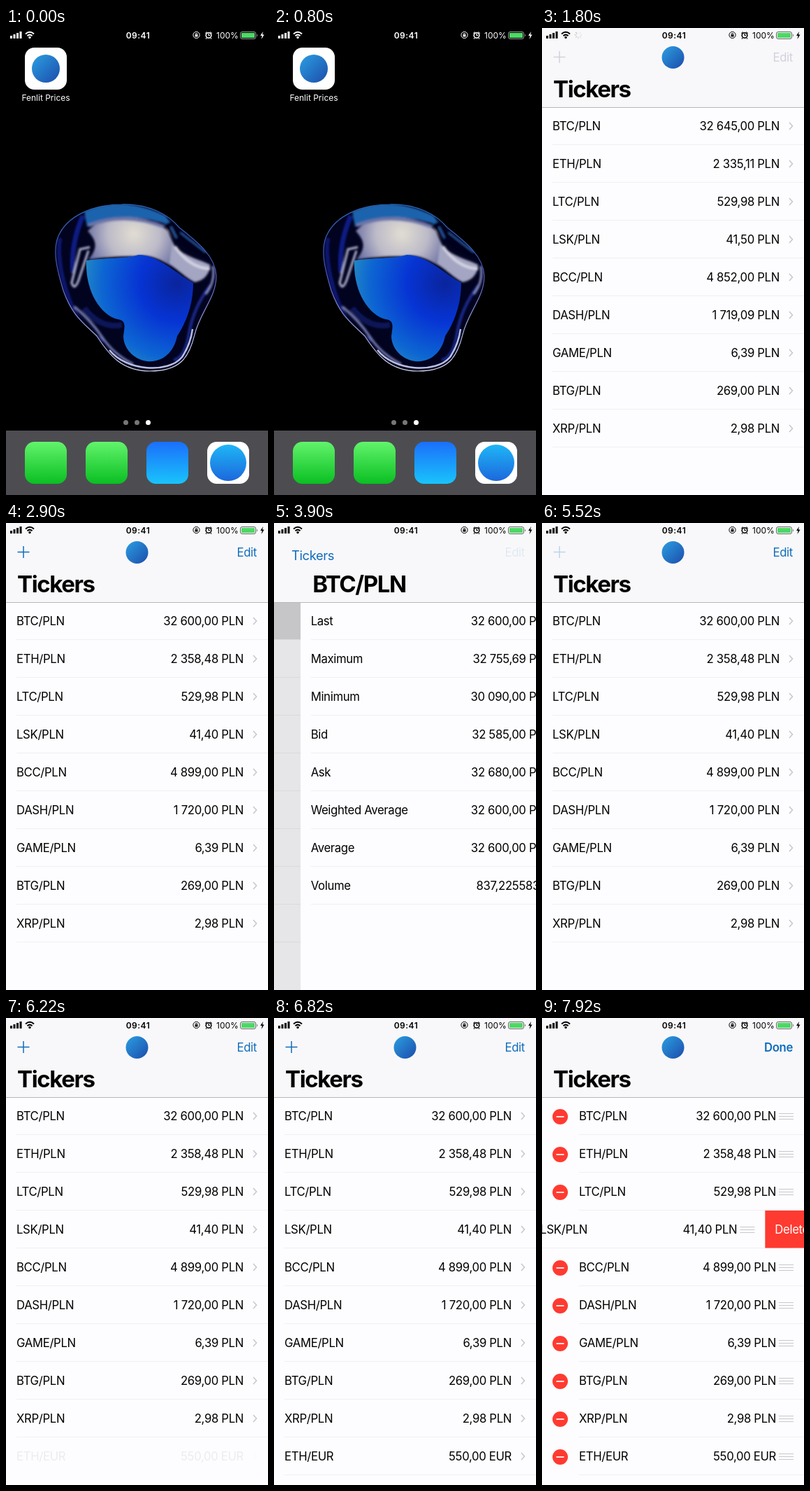
These frames come from a looping animation (375 by 667 pixels, 8000 ms). An HTML page:

```html
<!DOCTYPE html>
<html lang="en">
<head>
<meta charset="utf-8">
<title>Price tickers</title>
<style>
  html, body { margin: 0; width: 100%; height: 100%; overflow: hidden; background: #000; }
  svg { display: block; width: 375px; height: 667px; }
  text { font: 16.7px Inter, Arial, sans-serif; letter-spacing: -.32px; fill: currentColor; white-space: pre; }
  .end { text-anchor: end; }
  .mid { text-anchor: middle; }
  .large { font-size: 33px; font-weight: 700; letter-spacing: -1.4px; }
  .bold { font-weight: 600; }
  .small { font-size: 12px; letter-spacing: 0; }
  .white { fill: #fff; }
  .tint { color: #0f6cbc; }
  .line { fill: none; stroke: currentColor; }
  .sep { stroke: #f0f0f3; }
</style>
</head>
<body>
<svg viewBox="0 0 375 667">
  <defs>
    <linearGradient id="green" x2="0" y2="1"><stop stop-color="#62f36c"/><stop offset="1" stop-color="#0abf22"/></linearGradient>
    <linearGradient id="mail" x2="0" y2="1"><stop stop-color="#1b6ffb"/><stop offset="1" stop-color="#19c4fb"/></linearGradient>
    <linearGradient id="web" x2="0" y2="1"><stop stop-color="#1fb6f6"/><stop offset="1" stop-color="#1c68dc"/></linearGradient>
    <linearGradient id="disc" x2="1" y2="1"><stop stop-color="#2b9fe2"/><stop offset="1" stop-color="#1c4cab"/></linearGradient>
    <linearGradient id="rim" x2="0" y2="1"><stop stop-color="#2a68b8"/><stop offset=".4" stop-color="#4a55b4"/><stop offset="1" stop-color="#d9dcf2"/></linearGradient>
    <radialGradient id="core" gradientUnits="userSpaceOnUse" cx="245" cy="365" r="135"><stop stop-color="#0a249c"/><stop offset=".4" stop-color="#0634d4"/><stop offset=".8" stop-color="#0d66d2"/><stop offset="1" stop-color="#2287c4"/></radialGradient>
    <radialGradient id="cream" gradientUnits="userSpaceOnUse" cx="183" cy="294" r="75"><stop stop-color="#e2ddd2"/><stop offset=".5" stop-color="#bcbac8"/><stop offset="1" stop-color="#5c629c"/></radialGradient>
    <filter id="soft" x="-20%" y="-20%" width="140%" height="140%"><feGaussianBlur stdDeviation="1.8"/></filter>
    <path id="blob" d="M165 252C205 251 232 266 248 285C272 304 300 325 301 354C301 385 278 405 270 438C262 470 250 490 206 490C165 490 147 466 130 440C112 422 95 412 82 375C73 345 66 318 75 297C88 268 125 252 165 252Z"/>
    <clipPath id="blobClip"><use href="#blob"/></clipPath>
  </defs>

  <g id="home">
    <rect width="375" height="667"/>
    <use href="#blob" fill="#02031f"/>
    <g clip-path="url(#blobClip)">
      <g filter="url(#soft)" fill="none">
        <path d="M112 262Q165 238 228 268L240 284Q178 258 116 284Z" fill="#1c63ae"/>
        <path d="M110 268Q92 310 96 350" stroke="#0d1a86" stroke-width="7"/>
        <path d="M77 300Q72 340 92 392T140 445" stroke="#0c1470" stroke-width="6"/>
        <path d="M117 290C140 264 205 264 232 290C238 306 246 318 256 352C228 334 208 321 185 326C158 326 132 328 118 331C130 316 132 306 117 290Z" fill="url(#cream)"/>
        <path d="M118 282Q170 262 226 284" stroke="#6d76a8" stroke-width="5"/>
        <path d="M238 306C250 326 276 330 292 338C292 350 284 361 270 363C258 357 246 346 234 336Z" fill="#a3a5c2"/>
        <path d="M242 312Q262 342 292 344" stroke="#d4d4e2" stroke-width="4"/>
        <path d="M232 278Q250 312 298 326" stroke="#03041c" stroke-width="12"/>
        <path d="M236 284L244 300M250 292L286 320" stroke="#2d63b4" stroke-width="2"/>
        <path d="M120 313L106 316L94 364Q98 376 104 360L118 318" stroke="#b4b8d6" stroke-width="3"/>
        <path d="M112 400Q135 430 166 424" stroke="#0b1258" stroke-width="8"/>
        <path d="M292 368Q268 400 262 436T240 474" stroke="#1a2a92" stroke-width="4"/>
        <path d="M98 398Q122 418 138 442T182 480" stroke="#7f88c4" stroke-width="3"/>
        <path d="M296 340Q300 362 286 380" stroke="#8a92c8" stroke-width="3"/>
      </g>
      <path d="M115 332C140 328 170 330 190 324C220 325 245 352 268 364C268 395 258 420 245 440C240 465 222 478 202 476C180 473 168 455 168 440C170 425 172 418 160 416C135 410 113 375 115 332Z" fill="url(#core)"/>
      <path d="M148 460C172 490 232 494 252 470Q264 452 267 430" fill="none" stroke="#b9bfe2" stroke-width="2.500"/>
    </g>
    <use href="#blob" fill="none" stroke="url(#rim)" stroke-width="1.200"/>
    <rect x="27" y="28" width="60" height="60" rx="13.5" fill="#fff"/>
    <circle cx="57" cy="58" r="20" fill="url(#disc)"/>
    <text class="small mid white" x="57" y="104">Fenlit Prices</text>
    <g fill="#777"><circle cx="171.500" cy="563.5" r="3.5"/><circle cx="187.500" cy="563.5" r="3.5"/><circle cx="203.500" cy="563.5" r="3.5" fill="#fff"/></g>
    <rect y="575" width="375" height="92" fill="#4d4d51"/>
    <g id="dock"></g>
  </g>

  <g id="app">
    <rect width="375" height="667" fill="#fdfcfe"/>
    <g id="list"></g>
    <rect id="dim" y="113" width="375" height="554"/>
    <g id="detail"><rect y="113" width="375" height="554" fill="#fdfcfe"/></g>
    <rect width="375" height="113" fill="#f8f8fa"/>
    <path d="M0 113.500H375" stroke="#b7b7bb"/>
    <g id="nav" class="tint">
      <g id="plusFade"><path id="plus" class="line" d="M16.500 41.500H33.500M25 33V50" stroke-width="1.5"/></g>
      <g id="edit"><text id="editText" class="end" x="359" y="48">Edit</text></g>
    </g>
    <text id="done" class="tint end bold" x="359" y="48">Done</text>
    <circle id="logo" cx="187.500" cy="42" r="16" fill="url(#disc)"/>
    <text id="title" class="large">Tickers</text>
    <text id="back" class="tint">Tickers</text>
    <path id="chevron" class="tint line" d="M18 33L9 42L18 51" stroke-width="2.5"/>
    <text id="pair" class="large" x="17.500" y="98.500">BTC/PLN</text>
  </g>

  <g id="status">
    <path d="M6 15v-4h3v4zM10.500 15v-6h3v6zM15 15v-8h3v8zM19.500 15v-10h3v10z" fill="currentColor"/>
    <path class="line" d="M28 8.500Q34 3 40 8.500M30.500 11.300Q34 8 37.500 11.300" stroke-width="2"/>
    <circle cx="34" cy="13.500" r="1.700" fill="currentColor"/>
    <text class="small mid bold" x="189" y="14.500" style="letter-spacing:.5px">09:41</text>
    <circle class="line" cx="272.500" cy="10" r="4.600"/>
    <path d="M270.500 9.500h4v3h-4z" fill="currentColor"/><path class="line" d="M271.300 9.500v-1.500h2.400v1.500"/>
    <circle class="line" cx="290" cy="10.500" r="3.800" stroke-width="1.600"/>
    <path class="line" d="M290 8v2.500h2M285.500 8l2-2.500M294.500 8l-2-2.500M287 14.500l-1 1M293 14.500l1 1" stroke-width="1.200"/>
    <text class="small" x="301" y="14.500">100%</text>
    <rect class="line" x="335.500" y="5.500" width="22" height="10" rx="2.500" opacity=".6"/>
    <rect x="337" y="7" width="19" height="7" rx="1" fill="#4cd964"/>
    <path d="M359 8.500q2 2 0 4z" fill="currentColor" opacity=".6"/>
    <path d="M368 5l-4 6h2.500l-1 5 4-6.500h-2.500z" fill="currentColor"/>
    <g id="spinner"></g>
  </g>
</svg>
<script>
const LOOP = 8000;
const $ = s => document.querySelector(s);
const add = (s, markup) => $(s).insertAdjacentHTML('beforeend', markup);

// Static parts
add('#dock', ['url(#green)', 'url(#green)', 'url(#mail)', '#fff'].map((fill, i) =>
  `<rect x="${27 + 87 * i}" y="591" width="60" height="60" rx="13.5" fill="${fill}"/>`).join('') +
  '<circle cx="318" cy="621" r="26" fill="url(#web)"/>');

add('#spinner', Array.from({ length: 8 }, (_, i) =>
  `<path d="M52 4.500v3" stroke="#777" stroke-opacity="${(i + 1) / 8}" transform="rotate(${45 * i} 52 10)"/>`).join(''));

// Pair, price, and the price before the first refresh where it differs
const tickers = [
  ['BTC/PLN', '32 600,00 PLN', '32 645,00 PLN'],
  ['ETH/PLN', '2 358,48 PLN', '2 335,11 PLN'],
  ['LTC/PLN', '529,98 PLN'],
  ['LSK/PLN', '41,40 PLN', '41,50 PLN'],
  ['BCC/PLN', '4 899,00 PLN', '4 852,00 PLN'],
  ['DASH/PLN', '1 720,00 PLN', '1 719,09 PLN'],
  ['GAME/PLN', '6,39 PLN'],
  ['BTG/PLN', '269,00 PLN'],
  ['XRP/PLN', '2,98 PLN'],
  ['ETH/EUR', '550,00 EUR']
];
const stats = [
  ['Last', '32 600,00 PLN'], ['Maximum', '32 755,69 PLN'], ['Minimum', '30 090,00 PLN'],
  ['Bid', '32 585,00 PLN'], ['Ask', '32 680,00 PLN'], ['Weighted Average', '32 600,00 PLN'],
  ['Average', '32 600,00 PLN'], ['Volume', '837,22558310']
];
const rowY = i => 140 + 54 * i;
const sep = '<path class="sep" d="M15 26.500H375"/>';

add('#list', tickers.map(([pair, price, old], i) => `
  <g transform="translate(0 ${rowY(i)})"><g id="row${i}">
    ${i ? '' : '<rect id="press" y="-26" width="375" height="53" fill="#d9d9dc"/>'}
    <g class="label">${sep}<text x="15" y="6">${pair}</text></g>
    <g class="price">
      <text class="end ${old ? 'fresh' : ''}" x="340" y="6">${price}</text>
      ${old ? `<text class="end stale" x="340" y="6">${old}</text>` : ''}
    </g>
    <path class="arrow" d="M354 -5l4.500 5l-4.500 5" fill="none" stroke="#c7c7cc" stroke-width="1.500"/>
    <g class="minus"><circle cx="26" cy="1" r="11" fill="#ff3a30"/><path d="M20.500 1h11" stroke="#fff" stroke-width="1.700"/></g>
    <path class="grip" d="M339 -3.500h21M339 .5h21M339 4.500h21" stroke="#c8c8cd"/>
    ${i === 3 ? '<rect x="375" y="-27" width="90" height="53.500" fill="#ff3a30"/><text class="white" x="389" y="6">Delete</text>' : ''}
  </g></g>`).join(''));

add('#detail', stats.map(([name, value], i) =>
  `<g transform="translate(0 ${rowY(i)})">${sep}<text x="15" y="6">${name}</text><text class="end" x="359" y="6">${value}</text></g>`).join(''));

// Motion: each segment is [start, end, from, to, easing]; values hold in between
const GLIDE = 'cubic-bezier(.2,.785,.2,1)';
const anims = [];
function tween(sel, prop, segments) {
  const frames = [{ [prop]: segments[0][2], offset: 0 }];
  for (const [t0, t1, from, to, easing = 'linear'] of segments)
    frames.push({ [prop]: from, offset: t0 / LOOP, easing }, { [prop]: to, offset: t1 / LOOP });
  frames.push({ [prop]: segments.at(-1)[3], offset: 1 });
  for (const node of document.querySelectorAll(sel)) {
    const a = node.animate(frames, { duration: LOOP, fill: 'both' });
    a.pause();
    anims.push(a);
  }
}
const fade = (sel, ...segments) => tween(sel, 'opacity', segments);
const move = (sel, ...segments) => tween(sel, 'transform', segments);
const x = n => `translateX(${n}px)`;
const place = (px, py, k) => `translate(${px}px,${py}px) scale(${k})`;

// Launch and first refresh
fade('#app', [1000, 1100, 0, 1]);
move('#app', [1000, 1400, 'translate(27px,28px) scale(.16,.09)', 'translate(0px,0px) scale(1,1)', GLIDE]);
tween('#status', 'color', [[1150, 1150, '#fff', '#000']]);
tween('#nav', 'color', [[1900, 1900, '#d2d1dc', '#0f6cbc']]);
fade('#spinner', [1400, 1500, 0, 1], [1700, 1900, 1, 0]);
fade('.stale', [2100, 2100, 1, 0]);
fade('.fresh', [2100, 2100, 0, 1]);

// Open the detail page and return
const PUSH = [3700, 4200], POP = [4700, 5200];
const visit = (from, to) => [[...PUSH, from, to, GLIDE], [...POP, to, from, GLIDE]];
const swap = (from, to) => [[3700, 3880, from, to], [4700, 4900, to, from]];
fade('#press', [3600, 3600, 0, 1], [5200, 5450, 1, 0]);
move('#list', ...visit(x(0), x(-112)));
fade('#dim', ...visit(0, .1));
move('#detail', ...visit(x(375), x(0)));
move('#pair', ...visit(x(375), x(0)));
move('#title', ...visit(place(16, 98.5, 1), place(26, 48, .51)));
move('#back', ...visit(place(16, 98.5, 1.96), place(26, 48, 1)));
fade('#title', ...swap(1, 0));
fade('#back', ...swap(0, 1));
fade('#chevron', [3900, 4200, 0, 1], [4700, 4850, 1, 0]);
fade('#logo', ...swap(1, 0));
fade('#edit', ...visit(1, 0));

// Add a pair
fade('#plus', ...swap(1, 0), [5450, 5450, 1, .25], [5650, 5750, .25, 1]);
fade('#row9', [6200, 6500, 0, 1]);

// Edit mode and row removal
const EDIT = [7150, 7450];
const edit = (from, to) => [...EDIT, from, to, 'ease-in-out'];
move('.label', edit(x(0), x(38)));
move('.price', edit(x(0), x(-5)));
move('.minus', edit(x(-40), x(0)));
move('.grip', edit(x(40), x(0)));
fade('.grip', edit(0, 1));
fade('.arrow', edit(1, 0));
fade('#plusFade', edit(1, 0));
fade('#editText', edit(1, 0));
fade('#done', edit(0, 1));
move('#row3', [7820, 8000, x(0), x(-75), 'ease-out']);

// The picture advances ten times a second, with one short step at 4400
const snap = t => t < 4420 ? Math.floor(t / 100) * 100 : Math.floor((t - 20) / 100) * 100 + 20;
const start = performance.now();
function draw() {
  const t = snap((performance.now() - start) % LOOP);
  for (const a of anims) a.currentTime = t;
  requestAnimationFrame(draw);
}
draw();
</script>
</body>
</html>
```
